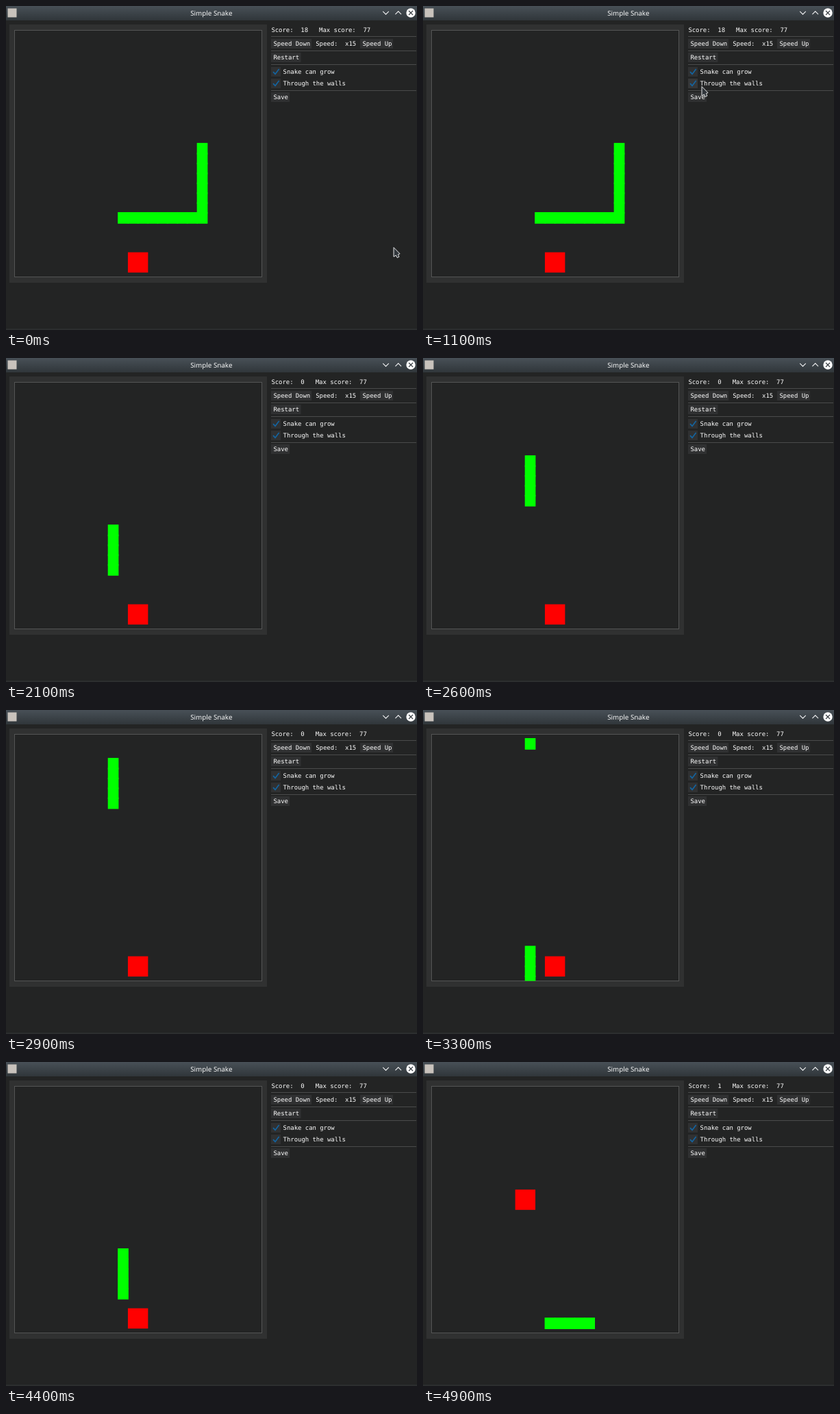
These frames come from a looping animation (600 px wide and 473 px high, 5 s). An HTML page:

```html
<!DOCTYPE html>
<html lang="en">
<head>
<meta charset="utf-8">
<title>Simple Snake</title>
<style>
  html, body { margin: 0; width: 100%; height: 100%; overflow: hidden; background: #232424; }
  svg { display: block; width: 100vw; height: 100vh; }
  text {
    white-space: pre; fill: #fff; text-rendering: geometricPrecision;
    font: 8.92px "DejaVu Sans Mono", "Liberation Mono", monospace;
  }
  .title { font: 9.8px "Noto Sans", "Open Sans", sans-serif; fill: #f4f5f5; text-anchor: middle; }
  .widget { fill: #303132; }
  .hot { fill: #363738; }
  .line { stroke: #4a4b4b; }
  .tick { fill: none; stroke: #1464a0; stroke-width: 1.7; }
  .chevron { fill: none; stroke: #eff0f1; stroke-width: 1.1; }
</style>
</head>
<body>
<svg viewBox="0 0 600 473" preserveAspectRatio="none">
  <defs>
    <linearGradient id="bar" x1="0" y1="0" x2="0" y2="1">
      <stop offset="0" stop-color="#485057"/>
      <stop offset="1" stop-color="#30363a"/>
    </linearGradient>
    <clipPath id="arena"><rect x="12.5" y="35.5" width="361" height="360"/></clipPath>
  </defs>

  <rect width="600" height="473" fill="#232424"/>
  <rect y="471" width="600" height="2" fill="#2c2e2f"/>

  <rect width="600" height="21" fill="url(#bar)"/>
  <rect x="2.5" y="3.5" width="13" height="13" fill="#c8c2bc"/>
  <text class="title" x="299.9" y="13.5">Simple Snake</text>
  <path class="chevron" d="M550.2 7.8l4.3 4.3 4.3-4.3M568.4 12.2l4.3-4.3 4.3 4.3"/>
  <circle cx="591" cy="10" r="6.7" fill="#fcfcfc"/>
  <path d="M588 7l6 6m0-6l-6 6" stroke="#343a3f" stroke-width="1.1"/>

  <rect x="5" y="27" width="376" height="377" fill="#303131"/>
  <rect x="12.5" y="35.5" width="361" height="360" fill="#232424" stroke="#545555"/>
  <g clip-path="url(#arena)">
    <rect id="food" width="29.4" height="29.6" fill="#f00"/>
    <g id="snake" fill="#0f0"></g>
  </g>

  <path class="line" d="M387 44.5H599M387 65.5H599M387 85.5H599M387 123.5H599"/>
  <g id="panel"></g>
  <text id="score" x="387.4" y="38"></text>
  <text x="452.2" y="58">Speed:  x15</text>

  <path id="cursor" d="M0 0V13.6L3.3 11.4 5.2 15 7.8 13.7 6.4 10.2 9 9.2Z"
        fill="#31363b" stroke="#e8e9ea" stroke-width="1" stroke-linejoin="round"/>
</svg>
<script>
const LOOP = 5000, TICK = 100, CELL = 14.44;
const $ = id => document.getElementById(id);
const px = col => 12.15 + col * CELL;
const py = row => 35 + row * CELL;

// label, x, y, hit width, checkbox?
const widgets = [
  ["Speed Down", 387, 48, 59],
  ["Speed Up", 517, 48, 48],
  ["Restart", 387, 68, 43.5],
  ["Snake can grow", 387, 89, 93, true],
  ["Through the walls", 387, 106, 108, true],
  ["Save", 387, 126, 27]
].map(([label, x, y, w, check]) => {
  const g = document.createElementNS("http://www.w3.org/2000/svg", "g");
  const tick = check ? `<path class="tick" d="M${x + 3} ${y + 7.2}l3 3.2 5.6-7.4"/>` : "";
  g.innerHTML = `<rect class="widget" x="${x}" y="${y}" width="${check ? 14 : w}" height="14"/>${tick}` +
    `<text x="${x + (check ? 17.6 : 3.5)}" y="${y + 10}">${label}</text>`;
  $("panel").append(g);
  return { x, y, w, box: g.firstChild };
});

// time, x, y of the pointer
const stops = [
  [600, 566, 352.5], [1100, 407, 117.5], [1200, 406, 103],
  [1400, 410, 75], [1800, 410, 75], [1900, 475, 92]
];

function pointer(t) {
  if (t <= stops[0][0]) return stops[0].slice(1);
  const i = stops.findIndex(s => s[0] >= t);
  if (i < 0) return null;
  const [a, b] = [stops[i - 1], stops[i]];
  const u = (t - a[0]) / (b[0] - a[0]), e = u * u * (3 - 2 * u);
  return [a[1] + (b[1] - a[1]) * e, a[2] + (b[2] - a[2]) * e];
}

// Cell of the head after n steps: up through the wall, then right, down, right.
function head(n) {
  if (n <= 26) return [10, (64 - n) % 25 + 1];
  if (n <= 37) return [11, n - 13];
  return [n - 26, 24];
}

function body(t) {
  if (t < 1500) {
    return Array.from({ length: 16 }, (_, i) => i < 9 ? [11 + i, 19] : [19, 27 - i]);
  }
  const n = Math.max(-2, Math.floor((t - 2100) * 15 / 1000 + 0.25));
  return Array.from({ length: 5 }, (_, i) => head(n - i));
}

function draw(t) {
  // Separate rectangles, so that soft edges add up where they overlap.
  $("snake").innerHTML = body(t).map(([c, r]) =>
    `<rect x="${px(c) - 7.85}" y="${py(r) - 8.4}" width="15.7" height="16.8"/>`).join("");

  const eaten = t >= 4700;
  const [fc, fr] = eaten ? [9.5, 11.5] : [12.5, 23.5];
  $("food").setAttribute("x", px(fc) - 14.7);
  $("food").setAttribute("y", py(fr) - 14.8);

  const score = t < 1500 ? 18 : eaten ? 1 : 0;
  $("score").textContent = `Score:  ${score}   Max score:  77`;

  const p = pointer(t);
  $("cursor").style.display = p ? "" : "none";
  if (p) $("cursor").setAttribute("transform", `translate(${p})`);
  for (const { x, y, w, box } of widgets) {
    const over = p && p[0] >= x && p[0] < x + w && p[1] >= y && p[1] < y + 14;
    box.setAttribute("class", over ? "hot" : "widget");
  }
}

const start = performance.now();
function frame() {
  const t = (performance.now() - start) % LOOP;
  draw(Math.floor(t / TICK) * TICK);
  requestAnimationFrame(frame);
}
frame();
</script>
</body>
</html>
```
